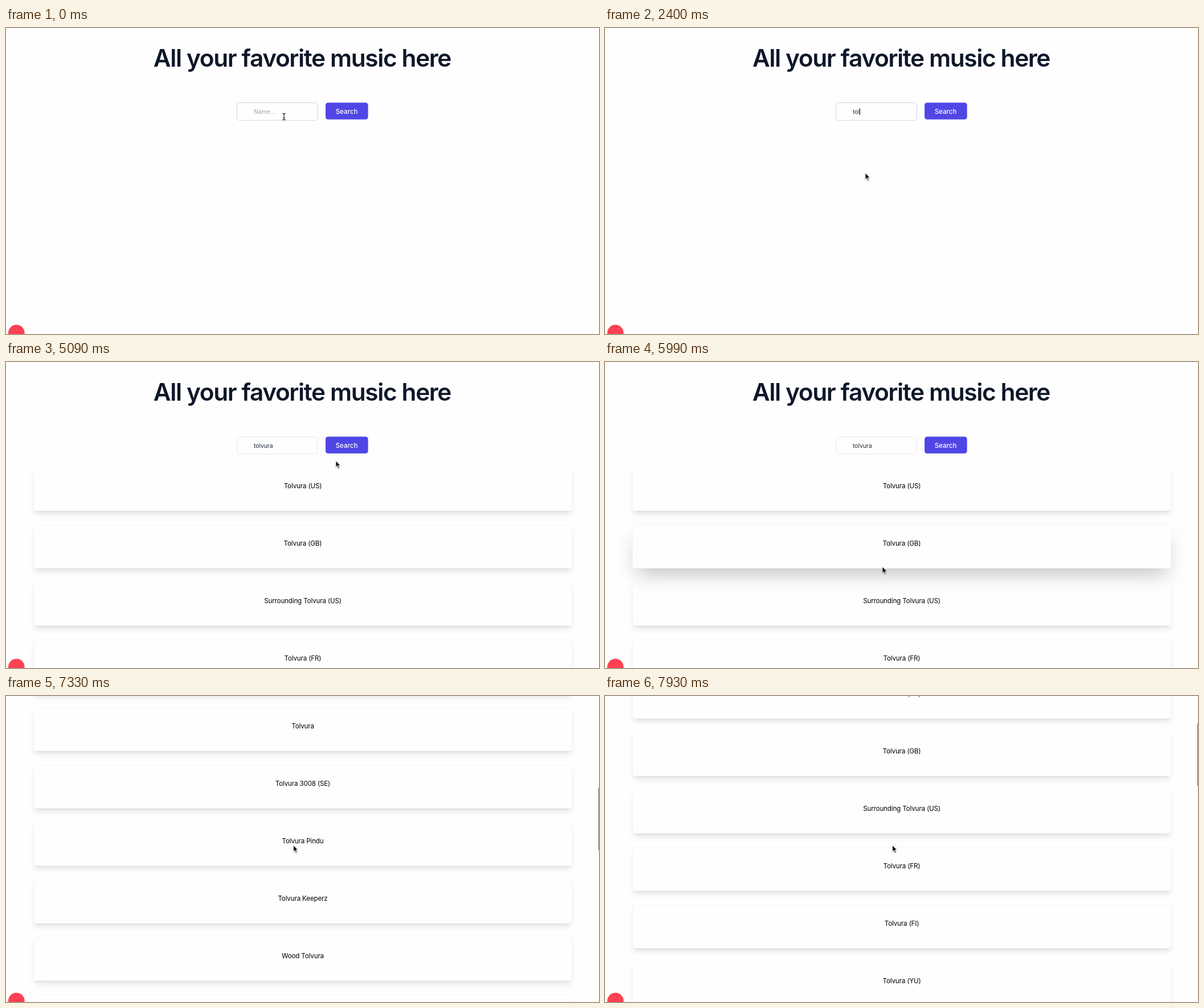
These frames come from a looping animation (1041 by 538 pixels, 8000 ms). An HTML page:

```html
<!DOCTYPE html>
<html lang="en">
<head>
<meta charset="utf-8">
<title>Music search</title>
<style>
  html, body { margin: 0; width: 100%; height: 100%; overflow: hidden; background: #fefefe; }
  body { position: relative; font-family: Inter, sans-serif; font-optical-sizing: none; }
  svg { position: absolute; left: 0; top: 0; overflow: visible; }
  #page { position: absolute; left: 0; top: 0; width: 1041px; height: 538px; }
  .card {
    position: absolute; left: 48px; width: 946px; height: 77px; box-sizing: border-box;
    border: 1px solid #f5f5f6; border-radius: 5px; text-align: center;
    font-size: 11.6px; letter-spacing: -0.15px; line-height: 64px; color: #000;
  }
</style>
</head>
<body>
<div id="page">
  <svg width="1041" height="538">
    <text x="519.9" y="68" text-anchor="middle" font-size="42.3" font-weight="600" letter-spacing="-1.33" fill="#0f172a">All your favorite music here</text>
    <rect id="field" rx="5" fill="#fefefe"/>
    <text id="query" x="435" y="150.8" font-size="10.5" letter-spacing="-0.1"></text>
    <rect id="caret" y="141" width="1" height="12" fill="#111827"/>
    <rect id="button" x="561" y="131.3" width="74.6" height="29.4" rx="4.5"/>
    <text x="598" y="150.6" text-anchor="middle" font-size="11.5" font-weight="500" fill="#fff">Search</text>
  </svg>
  <div id="list"></div>
</div>
<svg width="1041" height="538">
  <rect id="thumb" x="1040" width="3" height="110" rx="1" fill="#5c5c5c"/>
  <circle cx="18.3" cy="536" r="14.3" fill="#ff4154"/>
  <g id="arrow" style="filter: drop-shadow(0 1px 1px rgba(0,0,0,.3))">
    <path d="M0 0V11.2L2.5 8.8L4.3 13L6.2 12.2L4.4 8.1H7.9Z" fill="#000" stroke="#fff" stroke-width="0.9"/>
  </g>
  <g id="beam">
    <path d="M-2.5 -5.6Q0 -5.6 0 -4Q0 -5.6 2.5 -5.6M0 -4V4M-2.5 5.6Q0 5.6 0 4Q0 5.6 2.5 5.6M-1.3 1.8H1.3" fill="none" stroke="#111" stroke-width="1.1"/>
  </g>
  <g id="hand">
    <path d="M0 1.2Q.2 0 1.2 0Q2.2 0 2.3 1.2L2.6 4.4Q3.6 3.8 4.4 4.7Q5.5 4.2 6.2 5.3Q7.6 5 7.8 6.5Q8 9.2 6.7 10.8V12.6H2.2V11.2Q.6 9.6 -1.6 7.3Q-1.7 5.9 -.3 6.2L.7 7Z" fill="#fff" stroke="#111" stroke-width="0.9" stroke-linejoin="round"/>
  </g>
</svg>
<script>
// The screen refreshes once per tick; all motion is a function of the tick k.
const LOOP = 8000, START = 608, TICK = 149;
const BLUR = 22, RESULTS = 27, SCROLLING = 43;
const PITCH = 100.9, TOP = 185;
const WORD = 'tolvura';
const NAMES = ['Tolvura (US)', 'Tolvura (GB)', 'Surrounding Tolvura (US)', 'Tolvura (FR)',
  'Tolvura (FI)', 'Tolvura (YU)', 'Tolvura', 'Tolvura 3008 (SE)', 'Tolvura Pindu',
  'Tolvura Keeperz', 'Wood Tolvura', 'Tolvura (NL)'];

// Resting places of the pointer
const REST = [457, 255], BUTTON = [598, 151.5], CARD = [487, 360], GAP = [504.6, 262.5];

const $ = id => document.getElementById(id);
const set = (el, attrs) => { for (const a in attrs) el.setAttribute(a, attrs[a]); };
const show = (el, on) => { el.style.display = on ? '' : 'none'; };
const clamp = (v, lo, hi) => Math.min(hi, Math.max(lo, v));
const mix = (a, b, p) => a + (b - a) * p;
const progress = (k, from, to) => clamp((k - from) / (to - from), 0, 1);
const inside = (p, x, y, w, h) => p[0] >= x && p[0] <= x + w && p[1] >= y && p[1] <= y + h;
const curve = (a, c, b, p) => a.map((v, j) => mix(mix(v, c[j], p), mix(c[j], b[j], p), p));

function pointer(k) {
  if (k <= 7) {                       // round trip over the title
    const turn = -5.394 * progress(k, -1, 7);
    return [404 + 84 * Math.cos(turn), 156 + 128 * Math.sin(turn)];
  }
  if (k <= 20) return curve(REST, [540, 310], BUTTON, progress(k, 16, 20));
  if (k <= 36) return curve(BUTTON, [530, 225], CARD, progress(k, 29, 36));
  const p = progress(k, 36, 41);      // swing down, up and back
  return [mix(CARD[0], GAP[0], p), mix(CARD[1], GAP[1], p) + 127 * Math.sin(2 * Math.PI * p)];
}

const scrolled = k => 770 * progress(k, 42, 45) ** 1.86 - 548 * progress(k, 46, 49) ** 2.04;
const letters = k => clamp(k - 9, 0, 4) + clamp(k - 14, 0, 3);

// Hover is only picked up while the page is nearly still.
function hovered(i, k) {
  const s = scrolled(k);
  if (k < RESULTS || Math.abs(s - scrolled(k - 1)) > 60) return false;
  const y = pointer(k)[1] + s - TOP - PITCH * i;
  return y >= 0 && y < 76;
}

const RAISED = '0 18px 36px -9px rgba(0,0,0,.25)';
const FLAT = '0 7.3px 11px -2.2px rgba(0,0,0,.1), 0 2.9px 4.4px -2.9px rgba(0,0,0,.1)';

const cards = NAMES.map((name, i) => {
  const el = document.createElement('div');
  el.className = 'card';
  el.textContent = name;
  el.style.top = TOP + PITCH * i + 'px';
  $('list').appendChild(el);
  return el;
});

function render(time) {
  const k = Math.max(-1, Math.floor((time % LOOP - START) / TICK));
  const pos = pointer(k), scroll = scrolled(k), typed = letters(k);
  const focus = k < BLUR;

  $('page').style.transform = `translateY(${-scroll}px)`;
  set($('field'), focus
    ? { x: 405.2, y: 131.3, width: 142.2, height: 31, stroke: '#cbd5e1' }
    : { x: 405.6, y: 131.9, width: 141.3, height: 30, stroke: '#e7e9ed' });

  const query = $('query');
  query.textContent = typed ? WORD.slice(0, typed) : 'Name...';
  set(query, { fill: typed ? '#1f2937' : '#9ca8b8' });
  show($('caret'), focus && typed);
  if (typed) set($('caret'), { x: 435 + query.getComputedTextLength() });

  const onButton = !scroll && inside(pos, 561, 132, 75, 29);
  const onText = !scroll && (inside(pos, 405, 131, 143, 32) || inside(pos, 259, 32, 524, 44));
  set($('button'), { fill: onButton ? '#374151' : '#4f46e5' });

  show($('list'), k >= RESULTS);
  cards.forEach((el, i) => { el.style.boxShadow = hovered(i, k - 1) ? RAISED : FLAT; });

  show($('thumb'), k >= SCROLLING);
  set($('thumb'), { y: 2.4 + 0.2059 * scroll });

  const kind = onButton ? 'hand' : onText ? 'beam' : 'arrow';
  for (const id of ['arrow', 'beam', 'hand']) show($(id), id === kind);
  set($(kind), { transform: `translate(${pos[0]} ${pos[1]})` });
}

let begin = null;
function loop(now) {
  if (begin === null) begin = now;
  render(now - begin);
  requestAnimationFrame(loop);
}
render(0);
requestAnimationFrame(loop);
</script>
</body>
</html>
```
